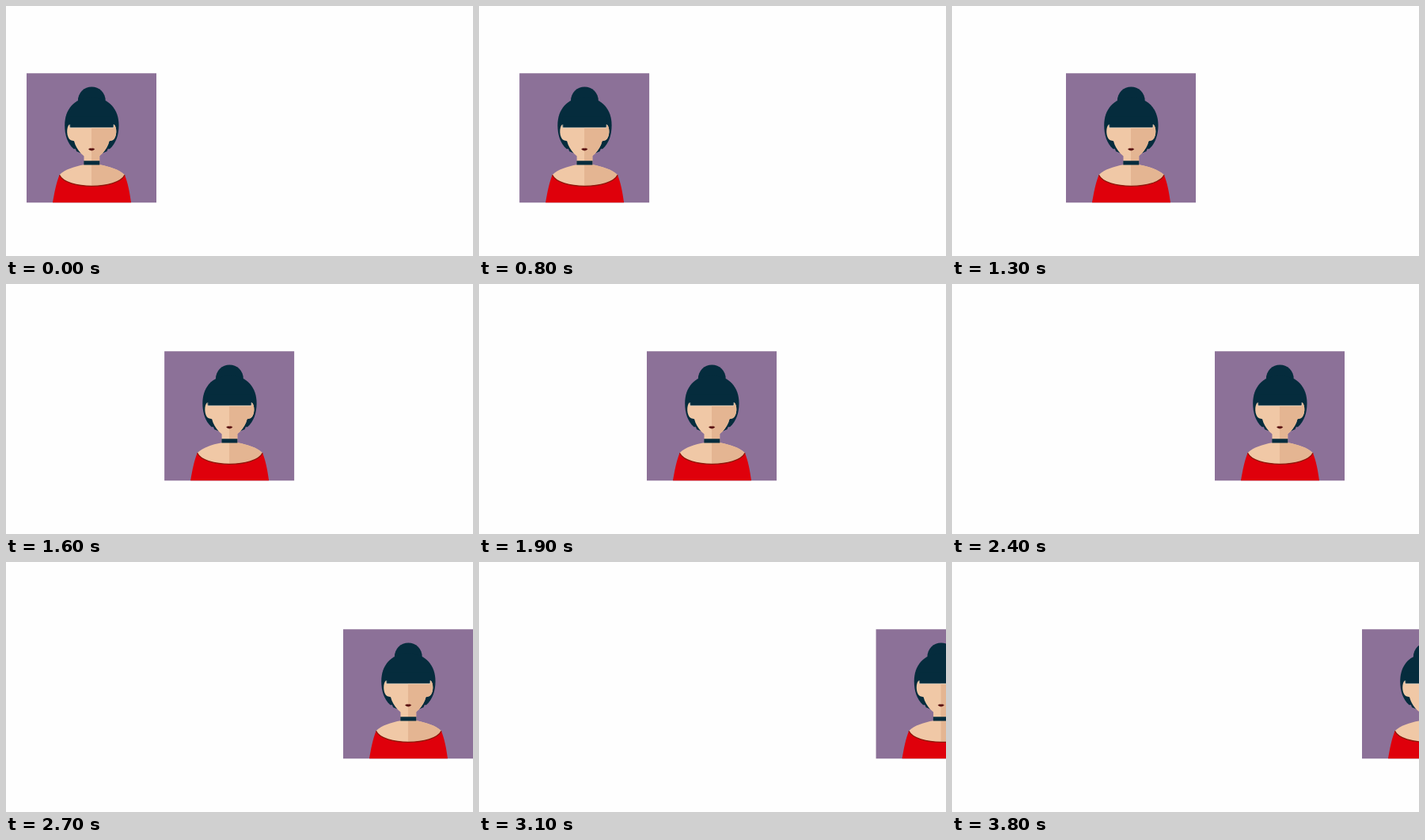
An HTML page for the animation above (4100 ms loop, 590 by 317 pixels).

```html
<!DOCTYPE html>
<html lang="en">
<head>
<meta charset="utf-8">
<title>Sliding portrait</title>
<style>
  html, body { margin: 0; width: 100%; height: 100%; overflow: hidden; background: #fefefe; }
  svg { display: block; }
</style>
</head>
<body>
<svg width="590" height="317" viewBox="0 0 590 317">
  <defs>
    <clipPath id="right"><rect x="82" y="0" width="82" height="164"/></clipPath>
    <g id="skin">
      <path d="M54 65C50 68 50 82 56 85L60 86C63 98 73 108 82.2 109C91.5 108 101.500 98 104.500 86L108.500 85C114.500 82 114.500 68 110.500 65L109 69H55Z"/>
      <path d="M72.500 103H92.200V116C104 118 117 122 124 129C115 148 50 148 41.500 129C48 122 61 118 72.500 116Z"/>
    </g>
  </defs>
  <g id="portrait">
    <rect width="164" height="164" fill="#8c7198"/>
    <g fill="#052c3d">
      <circle cx="82.300" cy="34.500" r="17.400"/>
      <path d="M48.200 66C48.200 46 60 31 82.300 31S116.500 46 116.500 66C116.500 78 113 89 105 96H59.500C51.500 89 48.200 78 48.200 66Z"/>
    </g>
    <path d="M58 85H107L101.500 99L82 107L63 99Z" fill="#052c3d"/>
    <use href="#skin" fill="#f0c8a6"/>
    <use href="#skin" fill="#e4b592" clip-path="url(#right)"/>
    <path d="M54.500 55H110V68.500H54.500Z" fill="#052c3d"/>
    <path d="M54.700 65V69H110V65" fill="none" stroke="#d5cec4" stroke-width=".7"/>
    <path d="M78 96.300Q80.500 94.300 82.200 95.200Q84 94.300 86.300 96.300Q82.200 100 78 96.300Z" fill="#5b1312"/>
    <rect x="72.300" y="111" width="20" height="5.200" fill="#052c3d"/>
    <path d="M41.500 129C50 147.800 115 147.800 124 129C128 139 130.500 152 132 164H33C35 152 37.500 139 41.500 129Z" fill="#df000b"/>
    <path d="M41.500 129C50 147.800 115 147.800 124 129" fill="none" stroke="#8d1609" stroke-width="1.300"/>
  </g>
</svg>
<script>
  const LOOP = 4100, STEP = 100;
  // time in steps, x, speed per step
  const knots = [
    [3, 26, 0], [9, 64, 14.5], [13, 144, 23.5], [15, 190, 17],
    [17, 203, 2.5], [19, 212, 8], [21, 237.5, 20.5], [24, 332, 36],
    [27, 426, 26], [33, 516, 3], [38, 518, 0]
  ];
  const portrait = document.getElementById('portrait');

  function positionAt(step) {
    const next = knots.findIndex(k => step < k[0]);
    if (next === 0) return knots[0][1];
    if (next < 0) return knots.at(-1)[1];
    const [t0, x0, v0] = knots[next - 1];
    const [t1, x1, v1] = knots[next];
    const span = t1 - t0, s = (step - t0) / span, r = 1 - s;
    return x0 + (x1 - x0) * s * s * (3 - 2 * s) + span * s * r * (v0 * r - v1 * s);
  }

  function draw() {
    const step = Math.floor(performance.now() % LOOP / STEP);
    portrait.setAttribute('transform', `translate(${positionAt(step).toFixed(2)} 85.3)`);
    requestAnimationFrame(draw);
  }
  draw();
</script>
</body>
</html>
```
